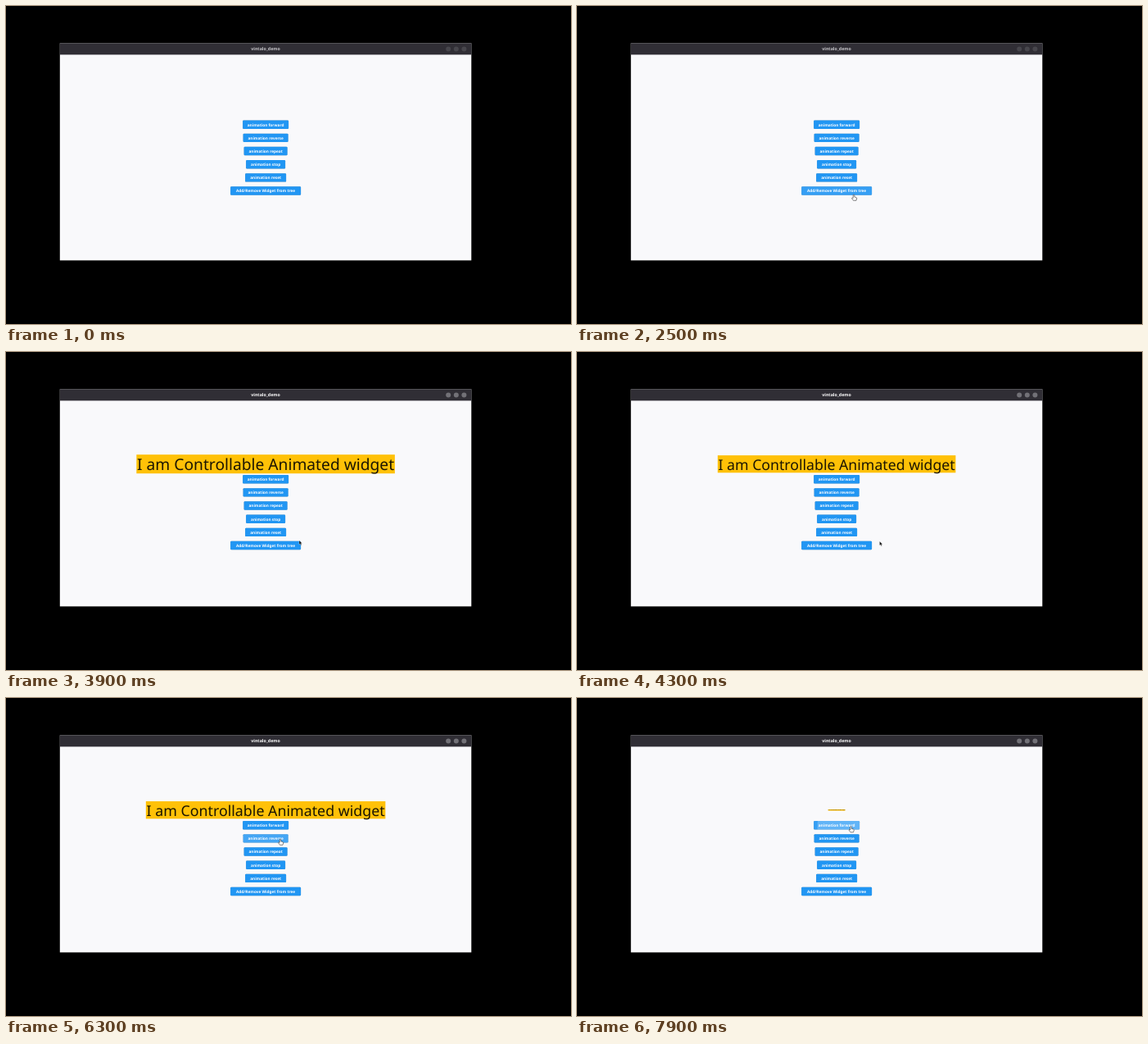
Write an HTML page that moves like this. It is 690 px wide and 388 px high and loops after 8000 ms.

```html
<!DOCTYPE html>
<html lang="en">
<head>
<meta charset="utf-8">
<title>Controllable animation</title>
<style>
  html, body { margin: 0; width: 100%; height: 100%; overflow: hidden; background: #000; }
  svg { display: block; text-rendering: geometricPrecision; }
  text { font-family: "Noto Sans", "Open Sans", sans-serif; text-anchor: middle; }
  #title { font-size: 5.28px; font-weight: bold; fill: #c9c8cc; }
  #dots { fill: #47464c; }
  .focused #title { fill: #fff; }
  .focused #dots { fill: #727177; }
  #banner text { font-size: 17.7px; fill: #1c1602; }
  .face { fill: #2196f3; filter: drop-shadow(0 .5px .5px rgba(0, 0, 0, .3)); }
  .face.hover { fill: #359ff4; }
  .ink { fill: #fff; }
  .label { font-size: 4.75px; font-weight: 600; fill: #fff; }
</style>
</head>
<body>
<svg id="stage" width="690" height="388" viewBox="0 0 690 388">
  <rect x="65.8" y="45.3" width="502.5" height="265.1" fill="#f9f9fb"/>
  <rect x="65.8" y="45.3" width="502.5" height="14.1" fill="#302e35"/>
  <text id="title" x="317" y="54.3">vintalo_demo</text>
  <g id="dots">
    <circle cx="540.2" cy="52.5" r="3"/>
    <circle cx="549.8" cy="52.5" r="3"/>
    <circle cx="559.4" cy="52.5" r="3"/>
  </g>
  <g id="banner">
    <rect x="-145.3" y="-10.6" width="290.6" height="21.2" fill="#ffc107"/>
    <text y="6.8">I am Controllable Animated widget</text>
  </g>
  <g id="buttons"></g>
  <g id="pointer">
    <path id="arrow" d="M0 0V5L1.2 4L2 5.8L2.9 5.4L2.1 3.7L3.6 3.6Z" fill="#111" stroke="#fff" stroke-width=".3"/>
    <path id="hand" d="M-.8 .6Q0 -.5 .8 .6V3L3 3.5Q3.9 3.9 3.7 5L3 7.3H-.5L-2.5 4.6Q-2.1 3.5 -.8 4.5Z"
      fill="#fff" stroke="#222" stroke-width=".55" stroke-linejoin="round"/>
  </g>
</svg>
<script>
const LOOP = 8000, STEP = 100, RUN = 490, FADE = 300;
const CENTER = 317.1, TOP = 139.5, PITCH = 16.17, HEIGHT = 10.4, SHIFT = 10.5;
const SHOW_AT = 700, FOCUS_AT = 3100, INSERT_AT = 3200;

const $ = id => document.getElementById(id);
const clamp = v => Math.min(1, Math.max(0, v));

function add(parent, tag, attrs, text = '') {
  const el = document.createElementNS('http://www.w3.org/2000/svg', tag);
  for (const name in attrs) el.setAttribute(name, attrs[name]);
  el.textContent = text;
  return parent.appendChild(el);
}

function makeButton(label, width, row, tapAt) {
  const left = CENTER - width / 2, top = TOP + row * PITCH;
  const box = { x: left, y: top, width, height: HEIGHT };
  const face = add($('buttons'), 'rect', { ...box, rx: 1.2, class: 'face' });
  const clip = add($('buttons'), 'svg', box);
  const ink = add(clip, 'circle', { class: 'ink' });
  add($('buttons'), 'text', { x: CENTER, y: top + HEIGHT / 2 + 1.85, class: 'label' }, label);
  return { left, top, width, tapAt, face, ink };
}

const buttons = [
  makeButton('animation forward', 56, 0, 7900),
  makeButton('animation reverse', 55, 1, 6100),
  makeButton('animation repeat', 53, 2),
  makeButton('animation stop', 48, 3),
  makeButton('animation reset', 50, 4),
  makeButton('Add/Remove Widget from tree', 86, 5, 3100)
];

// Pointer stops: time, x, y
const stops = [
  [700, 130, 257], [900, 187, 252], [1200, 290, 190], [1500, 338, 146],
  [2500, 338, 230], [2700, 338, 200], [2900, 338, 228], [3200, 338, 228],
  [4300, 369.5, 231], [4800, 346, 231], [5400, 335, 164], [5600, 335, 172],
  [6300, 335, 172], [6400, 335, 194], [7400, 334.5, 156.5]
];

function pointerAt(t) {
  const next = stops.findIndex(s => s[0] > t);
  if (next < 0) return stops.at(-1).slice(1);
  const [t0, x0, y0] = stops[Math.max(0, next - 1)], [t1, x1, y1] = stops[next];
  const k = t1 > t0 ? clamp((t - t0) / (t1 - t0)) : 0;
  return [x0 + (x1 - x0) * k, y0 + (y1 - y0) * k];
}

const bezier = (a, b, s) => 3 * a * s * (1 - s) ** 2 + 3 * b * s * s * (1 - s) + s ** 3;

function easeOutBack(x) {
  if (x <= 0 || x >= 1) return clamp(x);
  let lo = 0, hi = 1;
  for (let i = 0; i < 24; i++) {
    const mid = (lo + hi) / 2;
    if (bezier(.175, .32, mid) < x) lo = mid; else hi = mid;
  }
  return bezier(.885, 1.275, lo);
}

// The banner runs forward, in reverse, then forward again.
function bannerScale(t) {
  const run = start => clamp((t - start) / RUN);
  return easeOutBack(run(3573) - run(5998) + run(7893));
}

function draw(t) {
  const shift = t >= INSERT_AT ? SHIFT : 0;
  const [x, y] = pointerAt(t);
  const visible = t >= SHOW_AT;
  let over = false;

  $('stage').classList.toggle('focused', t >= FOCUS_AT);
  $('buttons').setAttribute('transform', `translate(0 ${shift})`);
  $('banner').setAttribute('transform', `translate(${CENTER} 136.7) scale(${bannerScale(t)})`);

  for (const { left, top, width, tapAt, face, ink } of buttons) {
    const dx = x - left, dy = y - top - shift;
    const hover = visible && dx >= 0 && dx <= width && dy >= 0 && dy <= HEIGHT;
    over = over || hover;
    face.classList.toggle('hover', hover);

    const age = t - tapAt, active = age >= 0 && age < FADE;
    ink.setAttribute('cx', dx);
    ink.setAttribute('cy', dy);
    ink.setAttribute('r', active ? 41 + age * .2 : 0);
    ink.setAttribute('opacity', active ? .22 * (1 - age / FADE) : 0);
  }

  $('pointer').setAttribute('transform', `translate(${x} ${y})`);
  $('arrow').style.display = visible && !over ? '' : 'none';
  $('hand').style.display = visible && over ? '' : 'none';
}

const start = performance.now();
function tick() {
  const t = (performance.now() - start) % LOOP;
  draw(Math.floor(t / STEP) * STEP);
  requestAnimationFrame(tick);
}
tick();
</script>
</body>
</html>
```
